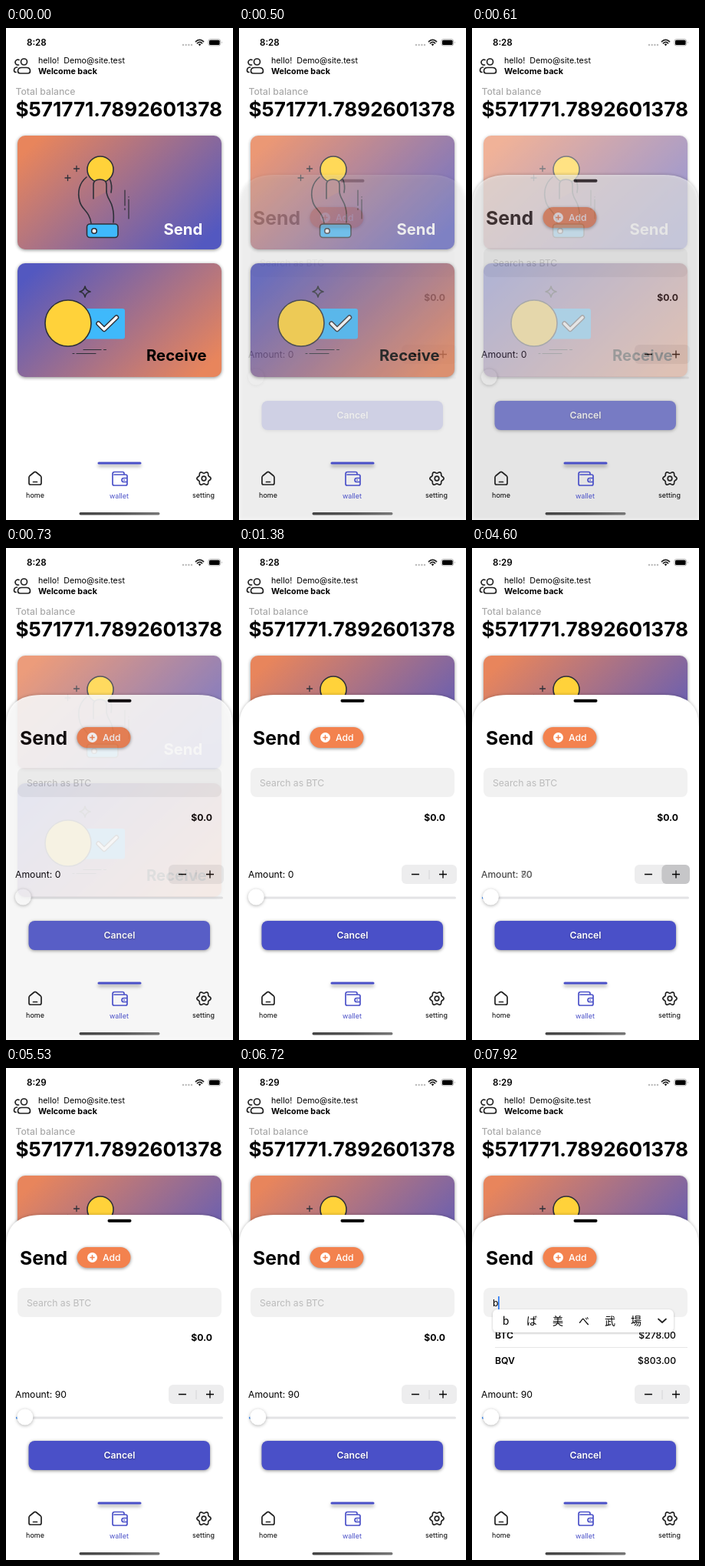
These frames come from a looping animation (296 by 640 pixels, 8000 ms). An HTML page:

```html
<!DOCTYPE html>
<html lang="en">
<head>
<meta charset="utf-8">
<title>Wallet</title>
<style>
  html, body { margin: 0; height: 100%; overflow: hidden; background: #fff; }
  svg { display: block; width: 100vw; height: 100vh; font-family: Inter, sans-serif; font-size: 12.2px; }
  text { white-space: pre; }
  .bold { font-weight: 700; }
  .semi { font-weight: 600; }
  .medium { font-weight: 500; }
  .end { text-anchor: end; }
  .mid { text-anchor: middle; }
  .small { font-size: 10.7px; }
  .tab { font-size: 9px; text-anchor: middle; }
  .line { fill: none; stroke: #222; stroke-width: 1.7; stroke-linecap: round; stroke-linejoin: round; }
  .ink { stroke: #2d3038; stroke-width: 1.6; stroke-linecap: round; stroke-linejoin: round; }
  .thin { stroke-width: 1.2; }
  .indigo { stroke: #4a50c8; }
  .shadow { filter: drop-shadow(0 1.5px 2px rgba(0,0,0,.45)); }
  .cjk { font: 14px "Noto Sans CJK JP", "Noto Sans CJK", sans-serif; text-anchor: middle; }
</style>
</head>
<body>
<svg viewBox="0 0 296 640" preserveAspectRatio="none">
  <defs>
    <linearGradient id="warm" x1="0" y1=".2" x2="1" y2=".8">
      <stop stop-color="#e8855c"/><stop offset="1" stop-color="#5358c0"/>
    </linearGradient>
    <linearGradient id="cool" x1="0" y1=".2" x2="1" y2=".8">
      <stop stop-color="#5358c0"/><stop offset="1" stop-color="#e8855c"/>
    </linearGradient>
    <linearGradient id="bar"><stop stop-color="#444"/><stop offset=".5" stop-color="#555"/><stop offset="1" stop-color="#777"/></linearGradient>
    <path id="panel" d="M0 640V233Q0 191 46 191H250Q296 191 296 233V640z"/>
  </defs>

  <!-- status bar -->
  <text id="clock" class="semi" x="27" y="23" font-size="11.6"></text>
  <g fill="#bbb"><circle cx="231" cy="22" r="1.2"/><circle cx="234.7" cy="22" r="1.2"/><circle cx="238.4" cy="22" r="1.2"/><circle cx="242" cy="22" r="1.2"/></g>
  <path class="line" d="M247.5 17.6q5-4.4 10 0M249.4 19.8q3.1-2.7 6.2 0"/>
  <path d="M250.7 21.3q1.8-1.5 3.6 0l-1.8 1.9z"/>
  <rect x="264" y="14.7" width="15.6" height="8.2" rx="2.4" fill="none" stroke="#999" stroke-width=".8"/>
  <rect x="265" y="15.7" width="13.6" height="6.2" rx="1.5"/>
  <path d="M281 17.5q1.3 1.3 0 2.7z" fill="#888"/>

  <!-- header -->
  <g class="line">
    <circle cx="23.5" cy="44" r="4"/>
    <path d="M20.5 51.5h6q5 0 5 4.5q0 3-3 3h-10q-3 0-3-3q0-4.5 5-4.5zM16.5 48a3.5 3.5 0 1 1 .5-6.5M14.5 51q-4 .5-4 4q0 2.5 2.5 2.5"/>
  </g>
  <text class="small" x="42" y="46">hello!  Demo@site.test</text>
  <text class="small bold" x="42" y="60">Welcome back</text>
  <text class="medium" x="12.5" y="87.3" fill="#aaa">Total balance</text>
  <text class="bold" x="12.5" y="114.8" font-size="26.1">$571771.7892601378</text>

  <!-- send card -->
  <g id="sendCard">
    <rect class="shadow" x="15" y="140" width="266" height="148" rx="10" fill="url(#warm)"/>
    <g class="ink" fill="none">
      <path d="M105 194C95 202 93 214 96 225C98 236 109 238 111 254M131 212c0 9 6 12 8 22q2 8 1 19"/>
      <path d="M92 179.500v7M88.500 183h7M80.500 191.500v7M77 195h7" stroke-width="1.3"/>
      <path d="M155 211v20M155 234.500v2M160 223v25M160 219.500v.5" class="thin"/>
      <circle cx="123" cy="184" r="17" fill="#ffd23a"/>
      <path d="M114 222V204q0-7 8.500-7t8.500 7v9" fill="#b4787f"/>
      <path d="M135 196q4 8 2 18"/>
      <rect x="105.500" y="255" width="40.500" height="17.500" rx="4" fill="#3fb9fb"/>
      <circle cx="115" cy="264" r="3.3" fill="#fff"/>
    </g>
    <text class="bold" x="205.500" y="269" font-size="20.3" fill="#fff">Send</text>
  </g>

  <!-- receive card -->
  <rect class="shadow" x="15" y="306" width="266" height="148" rx="10" fill="url(#cool)"/>
  <rect x="95" y="365" width="60" height="39.500" rx="3" fill="#3fb9fb"/>
  <g class="ink" fill="none">
    <circle cx="81" cy="384" r="30" fill="#ffd23a"/>
    <path d="M103 336q1 6 7 7q-6 1-7 7q-1-6-7-7q6-1 7-7z"/>
    <path d="M101 418.500h23M127.500 418.500h3M87 423.500h2M92 423.500h25" class="thin"/>
    <path d="M120.500 384.500l7.500 7.500l16-15.500" stroke-width="6.5"/>
    <path d="M120.500 384.500l7.500 7.500l16-15.500" stroke="#fff" stroke-width="3.6"/>
  </g>
  <text class="bold" x="183" y="433" font-size="20.3">Receive</text>

  <!-- bottom sheet, with a shadow that shows through while it fades in -->
  <use id="shade" href="#panel" style="filter:blur(2px)"/>
  <g id="sheet">
    <use href="#panel" fill="#fff"/>
    <rect x="132.500" y="196.800" width="31" height="4" rx="2"/>
    <text class="bold" x="18" y="256" font-size="24.8">Send</text>
    <rect class="shadow" x="92.500" y="233" width="70" height="27" rx="13.500" fill="#f3824e"/>
    <circle cx="112.500" cy="246.500" r="6.500" fill="#fff"/>
    <path d="M109.300 246.500h6.400M112.500 243.300v6.400" stroke="#f3824e" stroke-width="1.5"/>
    <text class="medium" x="126" y="251" fill="#fff">Add</text>

    <rect x="15" y="286" width="266" height="38" rx="8" fill="#f1f1f1"/>
    <text id="query" x="27" y="310"></text>
    <rect id="caret" y="297" width="1.7" height="17" fill="#2b7cf6"/>
    <text id="total" class="bold end" x="269" y="354.500">$0.0</text>

    <g id="results">
      <text class="semi" x="30" y="351.500">BTC</text><text class="medium end" x="266" y="351.500">$278.00</text>
      <path d="M30 363.500H281" stroke="#e0e0e0" stroke-width=".8"/>
      <text class="semi" x="30" y="385">BQV</text><text class="medium end" x="266" y="385">$803.00</text>
      <rect x="27" y="314" width="236" height="30" rx="6" fill="#fff" style="filter:drop-shadow(0 1px 1.5px rgba(0,0,0,.25))"/>
      <g id="candidates"></g>
      <path class="line" d="M243 326.500l5 4.500l5-4.500" stroke-width="1.4"/>
    </g>

    <text id="before" x="12" y="429"></text>
    <text id="after" x="12" y="429"></text>
    <rect x="212" y="412" width="72" height="25" rx="6" fill="#ededee"/>
    <path d="M248 419v12" stroke="#d4d4d6"/>
    <rect id="press" x="247.500" y="412" width="36.500" height="25" rx="6" fill="#c6c6c8"/>
    <path d="M225 424.500h10M261 424.500h10M266 419.500v10" stroke="#000" stroke-width="1.3"/>

    <rect x="13" y="453.500" width="270" height="3" rx="1.5" fill="#e3e3e5"/>
    <rect id="track" x="13" y="453.500" height="3" rx="1.5" fill="#2b84f6"/>
    <circle id="knob" cy="454" r="10.500" fill="#fff" style="filter:drop-shadow(0 1.5px 2px rgba(0,0,0,.3))"/>
    <rect class="shadow" x="29.500" y="485" width="236.500" height="38" rx="8" fill="#4a50c8"/>
    <text class="semi mid" x="148" y="508" fill="#fff" style="filter:drop-shadow(0 1px 1px rgba(0,0,0,.35))">Cancel</text>
  </g>

  <!-- tab bar -->
  <rect x="119.500" y="564.500" width="57" height="3" rx="1.5" fill="#4a50c8" style="filter:drop-shadow(0 3px 2px rgba(0,0,0,.35))"/>
  <path class="line" d="M31 582.500L36.500 578q1.500-1.200 3 0L45 582.500q1 1 1 2v7.500q0 2-2 2H32q-2 0-2-2v-7.500q0-1 1-2zM35.500 590.500h5"/>
  <path class="line indigo" d="M154 581v-1.500q0-2-2-2h-10.500q-2.500 0-2.500 2.500v13q0 2 2 2h15q2 0 2-2v-10q0-2-2-2h-15M158 585.500h-4.500a2.500 2.500 0 0 0 0 5h4.500M154 588h.1"/>
  <path id="gear" class="line"/>
  <circle class="line" cx="258" cy="586" r="2.800"/>
  <text class="tab" x="38" y="611">home</text>
  <text class="tab" x="147.500" y="611.500" fill="#4a50c8">wallet</text>
  <text class="tab" x="257.500" y="611">setting</text>
  <rect x="95.500" y="630" width="105" height="3.500" rx="1.700" fill="url(#bar)"/>
</svg>
<script>
  const LOOP = 8000, FIRST_TAP = 3200, TAP_GAP = 200, LAST_TAP = 8;
  const el = id => document.getElementById(id);
  const set = (id, attrs) => { for (const k in attrs) el(id).setAttribute(k, attrs[k]); };
  const clamp = (v, lo = 0, hi = 1) => Math.min(hi, Math.max(lo, v));
  const ramp = (t, start, end) => clamp((t - start) / (end - start));

  el('candidates').innerHTML = [...'bば美べ武場']
    .map((c, i) => `<text class="cjk" x="${44 + 34 * i}" y="334">${c}</text>`).join('');

  const gear = Array.from({ length: 72 }, (_, i) => {
    const a = i * Math.PI / 36, r = 8 + 1.1 * Math.cos(6 * a);
    return `${(258 + r * Math.cos(a)).toFixed(2)} ${(586 + r * Math.sin(a)).toFixed(2)}`;
  });
  set('gear', { d: `M${gear.join('L')}z` });

  function drawSheet(t) {
    set('sheet', { opacity: 1 - (1 - ramp(t, 470, 1000)) ** 3 });
    set('shade', { opacity: 0.25 * ramp(t, 470, 570) });
    set('sendCard', { opacity: 1 - 0.45 * ramp(t, 470, 560) * (1 - ramp(t, 560, 860)) });
  }

  function drawStepper(t) {
    const tap = clamp(Math.round((t - FIRST_TAP) / TAP_GAP), 0, LAST_TAP);
    const offset = t - FIRST_TAP - TAP_GAP * tap;
    const mix = clamp(offset / 100 + 0.5);
    el('before').textContent = `Amount: ${tap * 10}`;
    el('after').textContent = `Amount: ${tap * 10 + 10}`;
    set('before', { opacity: 1 - mix });
    set('after', { opacity: mix });
    set('press', { opacity: Math.abs(offset) < 100 ? Math.cos(offset * Math.PI / 200) ** 4 : 0 });
    const x = 22.3 + (tap + mix) * 0.28;
    set('knob', { cx: x });
    set('track', { width: x - 13 });
  }

  function drawSearch(t) {
    const focused = t >= 7260, typed = t >= 7480, shown = ramp(t, 7540, 7660);
    el('query').textContent = typed ? 'b' : 'Search as BTC';
    set('query', { fill: typed ? '#000' : '#bbb' });
    set('caret', { x: typed ? 34 : 27, opacity: +focused });
    set('results', { opacity: shown });
    set('total', { opacity: 1 - shown });
  }

  function frame(now) {
    const t = now % LOOP;
    el('clock').textContent = t < 3500 ? '8:28' : '8:29';
    drawSheet(t);
    drawStepper(t);
    drawSearch(t);
    requestAnimationFrame(frame);
  }
  requestAnimationFrame(frame);
</script>
</body>
</html>
```
